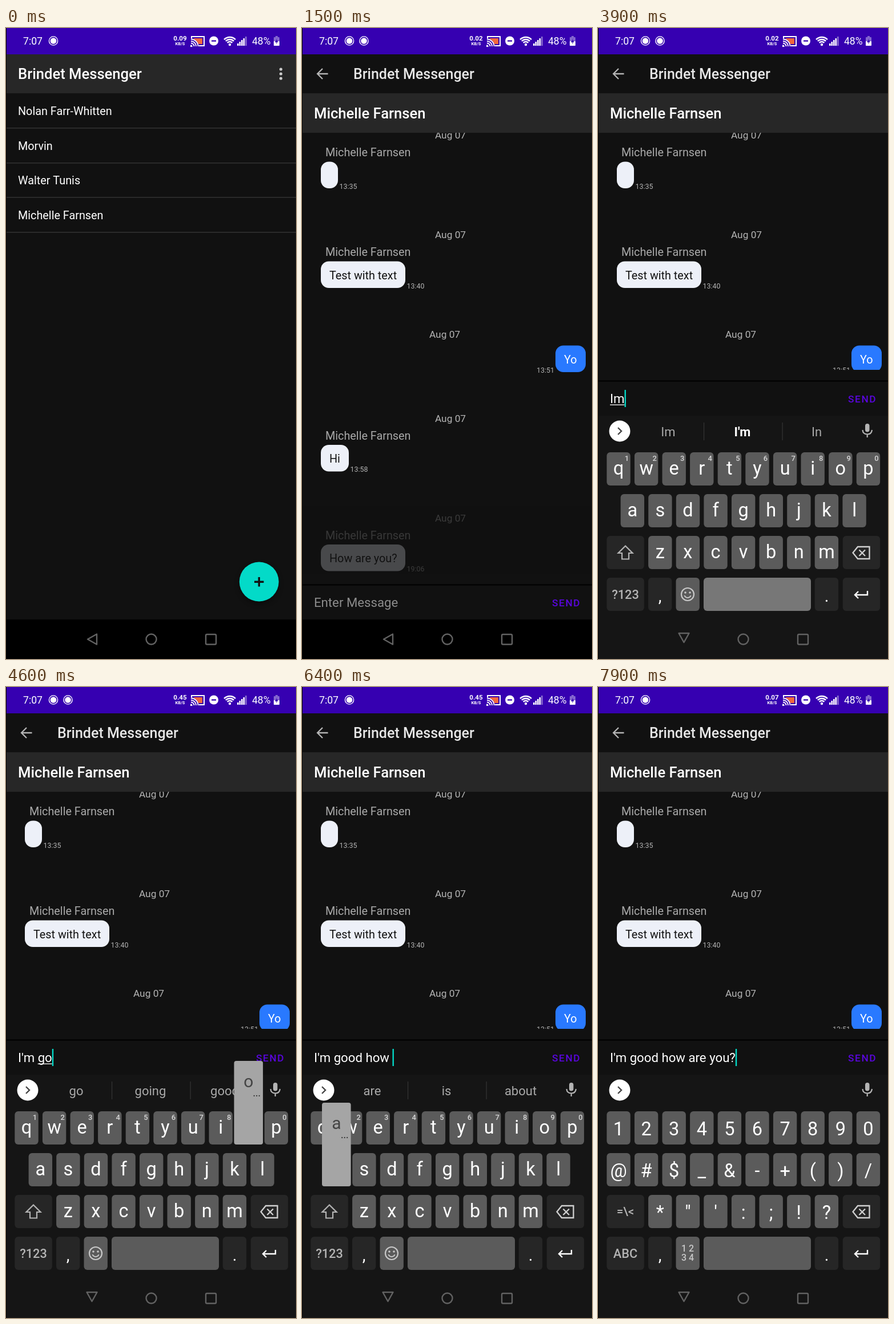
An HTML page with a canvas for the animation above (8000 ms loop, 508 px wide and 1102 px high).

```html
<!DOCTYPE html>
<html lang="en">
<head>
<meta charset="utf-8">
<title>Chat</title>
<style>
html, body { margin: 0; width: 100%; height: 100%; overflow: hidden; background: #000; }
canvas { display: block; }
</style>
</head>
<body>
<canvas id="stage" width="508" height="1102"></canvas>
<script>
const ctx = document.getElementById('stage').getContext('2d');
const LOOP = 8000, W = 508, H = 1102;
const APP = 'Brindet Messenger', FRIEND = 'Michelle Farnsen';
const CONTACTS = ['Nolan Farr-Whitten', 'Morvin', 'Walter Tunis', FRIEND];
const PURPLE = '#3600b1', BG = '#111', BAR = '#272727', TEAL = '#03dac8';
const KB = '#151515', KEY = '#5b5b5b', DARK = '#262626', SOFT = '#b4b4b4';

// Timeline, in ms
const TAP = 800, OPEN = 1000, LAST_MSG = 1450, FOCUS = 1600, KB_START = 2000, KB_END = 2250;
const HOLD = 140, SYMBOLS = 7450;
const PRESSES = [[3200, 'I'], [3500, 'm'], [3780, ' '], [4060, 'g'], [4280, 'o'], [4500, 'o'],
  [4780, 'd'], [5020, ' '], [5220, 'h'], [5430, 'o'], [5700, 'w'], [6180, ' '], [6330, 'a'],
  [6480, 'r'], [6630, 'e'], [6770, ' '], [6900, 'y'], [7020, 'o'], [7150, 'u'], [7650, '?']];
const HINTS = {
  'I': "I|I'm|It", 'Im': "Im|*I'm|In", "I'm ": 'not|so|going',
  'g': 'g|go|good', 'go': 'go|going|good', 'goo': 'goo|*good|goods', 'good': 'good|goods|goodbye',
  'good ': 'and|with|to', 'h': 'h|how|have', 'ho': 'ho|how|home', 'how': 'how|however|hows',
  'how ': 'are|is|about', 'a': 'a|and|are', 'ar': 'ar|are|around', 'are': 'are|area|areas',
  'are ': 'you|they|we', 'y': 'y|you|your', 'yo': 'yo|*you|your', 'you': 'you|your|young'
};
const LETTERS = { rows: ['qwertyuiop', 'asdfghjkl', 'zxcvbnm'], left: [36, 60.3, 108.8] };
const SIGNS = { rows: ['1234567890', '@#$_&-+()/', '*"\':;!?'], left: [36, 36, 108.8] };
const ROW_Y = [741, 814, 887, 960], PITCH = 48.6;

function text(s, x, y, size, color = '#fff', weight = 400, align = 'left') {
  ctx.font = `${weight} ${size}px Roboto, sans-serif`;
  ctx.textAlign = align;
  ctx.fillStyle = color;
  ctx.fillText(s, x, y);
}
const mid = (s, x, y, size, color, weight) => text(s, x, y, size, color, weight, 'center');

function box(x, y, w, h, color, r = 0) {
  ctx.fillStyle = color;
  ctx.beginPath();
  ctx.roundRect(x, y, w, h, r);
  ctx.fill();
}
function disc(x, y, r, color) {
  ctx.fillStyle = color;
  ctx.beginPath();
  ctx.arc(x, y, r, 0, 7);
  ctx.fill();
}
function arc(x, y, r, color, width, from = 0, to = 2 * Math.PI) {
  ctx.strokeStyle = color;
  ctx.lineWidth = width;
  ctx.beginPath();
  ctx.arc(x, y, r, from, to);
  ctx.stroke();
}
function draw(d, color, width = 2) {
  ctx.strokeStyle = color;
  ctx.lineWidth = width;
  ctx.stroke(new Path2D(d));
}
function fill(d, color) {
  ctx.fillStyle = color;
  ctx.fill(new Path2D(d));
}
function clipped(x, y, w, h, paint) {
  ctx.save();
  ctx.beginPath();
  ctx.rect(x, y, w, h);
  ctx.clip();
  paint();
  ctx.restore();
}

function statusBar(t) {
  box(1, 0, W, 46, PURPLE);
  text('7:07', 30, 28.5, 17.6);
  for (const x of t >= OPEN && t < 5000 ? [83, 108.5] : [83]) {
    arc(x, 22.5, 7.6, '#fff', 1.4);
    disc(x, 22.5, 5.3, '#fff');
  }
  const speed = t < 1300 ? '0.09' : t < 4000 ? '0.02' : t < 6500 ? '0.45' : '0.07';
  mid(speed, 305, 22, 11.6, '#fff', 700);
  mid('KB/S', 305, 30, 7.5, '#fff', 700);

  draw('M325 15H347V31H325Z', '#fff', 2);
  box(329, 18, 15, 10, '#f4673c');
  clipped(323, 17, 16, 16, () => {
    disc(323, 33, 15, PURPLE);
    disc(324, 32, 2.5, '#fff');
    for (const r of [5.5, 9, 12.5]) arc(324, 32, r, '#fff', 1.8, -Math.PI / 2, 0);
  });

  disc(364, 22.5, 8, '#fff');
  box(360, 21.4, 8, 2.3, PURPLE);
  disc(392, 29, 2.2, '#fff');
  for (const r of [6, 10, 14]) arc(392, 30, r, '#fff', 2.5, -2.36, -0.78);
  for (let i = 0; i < 5; i++) {
    const h = 4 + 3 * i;
    box(405 + 3.5 * i, 31 - h, 2.6, h, i < 4 ? '#fff' : '#8d70d0');
  }
  text('48%', 431, 28.5, 17.5);
  box(472, 14, 4, 3, '#8466cf');
  box(469, 16, 10, 15, '#8466cf', 1);
  box(469, 23, 10, 8, '#fff', 1);
  fill('M475 18L471 25H474L473 29L477 22H474Z', PURPLE);
}

function contacts(t) {
  box(1, 45, W, 69, BAR);
  text(APP, 21, 88.5, 25.6, '#fff', 500);
  for (const y of [72, 80, 88]) disc(481.5, y, 2.6, '#c8c8c8');
  if (t >= TAP) box(1, 297, W, 59, '#303030');
  CONTACTS.forEach((name, i) => {
    const y = 114 + 60.7 * i;
    text(name, 21, y + 38, 19.8);
    box(1, Math.round(y + 60), W, 1.5, '#333');
  });
  ctx.save();
  ctx.shadowColor = '#0006';
  ctx.shadowBlur = 8;
  ctx.shadowOffsetY = 4;
  disc(443.3, 967, 34.5, TEAL);
  ctx.restore();
  draw('M435 967.3H451.5M443.3 959V975.5', '#111', 3.4);
}

function message(y, width, body, time) {
  mid('Aug 07', 260, y + 6, 17.3, SOFT);
  text(FRIEND, 41, y + 37, 19.8, '#a9a9a9');
  box(33, y + 46.5, width, 46.5, '#edf0f8', 14);
  text(body, 48, y + 77.5, 19.8, '#111');
  text(time, 35.5 + width, y + 93.5, 12.4, SOFT);
}

function chat(t, lift) {
  clipped(1, 183, W, 770 - lift, () => {
    message(187, 30, '', '13:35');
    message(361, 148, 'Test with text', '13:40');
    mid('Aug 07', 250, 541, 17.3, SOFT);
    box(444, 554.5, 53, 46.5, '#2979ff', 14);
    mid('Yo', 470.3, 585.5, 19.8);
    text('13:51', 411, 601.5, 12.4, SOFT);
    message(681.5, 49, 'Hi', '13:58');
    message(855.5, 148, 'How are you?', '19:06');
    // The last message fades in as one group: a veil thins out over it.
    ctx.globalAlpha = 1 - Math.max(0, Math.min(1, (t - LAST_MSG) / 200));
    box(1, 835, W, 120, BG);
    ctx.globalAlpha = 1;
  });
  draw('M45.5 80H27M36 71L27 80L36 89', '#b5b5b5', 2.3);
  text(APP, 90, 89, 25, '#e6e6e6', 500);
  box(1, 114, W, 69, BAR);
  text(FRIEND, 21, 158, 25.6, '#fff', 500);
}

function typed(t) {
  const s = PRESSES.filter(([at]) => t >= at + HOLD).map(p => p[1]).join('');
  return s.replace('Im ', "I'm ");
}
const lastWord = s => (s.match(/[\w']+ ?$/) || [''])[0];

function inputBar(t, lift, value) {
  const y = 973 - lift, base = y + 38;
  box(1, y - 1, W, 61, BG);
  box(1, y - 1.5, W, 2, '#000');
  text(value || 'Enter Message', 21, base, 22.2, value ? '#fff' : '#8c8c8c');
  const end = 21 + (value ? ctx.measureText(value).width : 0);
  const word = lastWord(value);
  if (word && !word.endsWith(' ')) {
    const w = ctx.measureText(word).width;
    box(end - w, base + 2.5, w, 1.3, '#fff');
  }
  if (t >= FOCUS && (value || Math.floor((t - FOCUS) / 500) % 2 === 0)) box(end, y + 15, 2.4, 30, TEAL);
  ctx.letterSpacing = '1.6px';
  text('SEND', 438, y + 37, 17.3, '#5a05de', 500);
  ctx.letterSpacing = '0px';
}

function toolbar() {
  const c = '#a6a6a6';
  draw('M100 694H115Q117 694 117 696V708L110 714.5H100Q97.5 714.5 97.5 712V696Q97.5 694 100 694Z', c, 2.3);
  draw('M117 707H112Q110 707 110 709V714M102 704Q105 710 110 705', c, 1.8);
  disc(103, 700, 1.6, c);
  disc(111, 700, 1.6, c);
  mid('GIF', 176.5, 711, 19.5, c, 900);
  draw('M238 695H255V715H238Z', c, 2.3);
  box(242, 692, 9, 6, c, 2);
  draw('M241 702H252M241 706H252M241 710H249', c, 1.6);
  arc(316, 704, 6, c, 5);
  for (let i = 0; i < 6; i++) arc(316, 704, 8.7, c, 4, i * 1.047 + 0.29, i * 1.047 + 0.75);
  box(359, 690, 1.2, 28, '#3a3a3a');
  for (const x of [394, 401.5, 409]) disc(x, 704, 2.4, c);
}

function suggestions(word) {
  if (!HINTS[word]) return;
  HINTS[word].split('|').forEach((s, i) => {
    const best = s[0] === '*';
    mid(best ? s.slice(1) : s, 123 + 130 * i, 712.5, 22, best ? '#fff' : '#a9a9a9', best ? 700 : 400);
  });
  for (const x of [185, 322.5]) box(x, 689, 1.2, 31, '#353535');
}

function keyboard(t, value) {
  const symbols = t >= SYMBOLS, caps = !value, layout = symbols ? SIGNS : LETTERS;
  const pressed = PRESSES.find(([at]) => t >= at && t < at + HOLD);
  const down = pressed && pressed[1];
  box(1, 677, W, H - 677, KB);

  disc(38, 704, 18.5, '#fff');
  draw(caps ? 'M41 698L35 704L41 710' : 'M35 698L41 704L35 710', '#444', 2.4);
  if (caps) toolbar();
  else suggestions(lastWord(value));
  box(468, 691, 7.5, 14.5, SOFT, 4);
  draw('M463.5 702Q464 709.5 471.7 709.5Q479 709.5 480 702M471.7 709V715', SOFT, 2.2);

  let popup;
  layout.rows.forEach((row, r) => [...row].forEach((ch, i) => {
    const x = layout.left[r] + PITCH * i, y = ROW_Y[r];
    box(x - 20.7, y, 41.4, 58, KEY, 6);
    const label = caps && !symbols ? ch.toUpperCase() : ch;
    mid(label, x, y + 29 + (caps || symbols ? 13 : 9.7), 32.5);
    if (!symbols && r === 0) mid((i + 1) % 10, x + 14.5, y + 15, 13, '#d8d8d8', 500);
    if (down && ch === down.toLowerCase()) popup = [x, y, label];
  }));

  const [, , y3, y4] = ROW_Y;
  box(15.3, y3, 65.5, 58, DARK, 6);
  box(428.7, y3, 65.5, 58, DARK, 6);
  const arrow = 'M48 904.5L60.5 917H54V927.5H42V917H35.5Z';
  if (symbols) mid('=\\<', 48, 922.5, 20.5, SOFT, 500);
  else if (caps) fill(arrow, SOFT);
  else draw(arrow, SOFT, 2.2);
  draw('M455 906H475.5V927H455L446.5 916.5Z', '#d0d0d0', 2.3);
  draw('M457.5 911.5L468 922M468 911.5L457.5 922', '#d0d0d0', 2.3);

  const toSymbols = t >= SYMBOLS - HOLD && !symbols;
  box(15.3, y4, 65.5, 58, toSymbols ? '#444' : DARK, 6);
  box(88, y4, 41.4, 58, DARK, 6);
  box(136.5, y4, 41.4, 58, KEY, 6);
  box(185, y4, 188, 58, down === ' ' ? '#777' : KEY, 6);
  box(379.7, y4, 41.4, 58, DARK, 6);
  box(428.7, y4, 65.5, 58, DARK, 6);
  mid(symbols ? 'ABC' : '?123', 48, 997, 21.7, SOFT, 500);
  mid(',', 108.5, 1002, 29);
  mid('.', 400.5, 1002, 29);
  if (symbols) {
    mid('1 2', 157, 986, 16, '#c8c8c8', 500);
    mid('3 4', 157, 1002, 16, '#c8c8c8', 500);
  } else {
    arc(157, 989, 11, '#c8c8c8', 2.2);
    disc(153, 986, 1.8, '#c8c8c8');
    disc(161, 986, 1.8, '#c8c8c8');
    arc(157, 989, 6, '#c8c8c8', 2, 0.35, 2.8);
  }
  draw('M472 983V990H450M456 984L450 990L456 996', '#fff', 2.4);

  if (popup) {
    const [x, y, label] = popup;
    box(x - 25.3, y - 88, 50.6, 146, '#a5a5a5', 4);
    mid(label, x, y - 42, 30, '#444');
    mid('...', x + 14.5, y - 26, 16, '#333', 500);
  }
}

function navBar(kbShown) {
  const c = '#626262';
  ctx.lineJoin = 'round';
  draw(kbShown ? 'M141.5 1057H159.5L150.5 1073Z' : 'M159 1058.5V1076.5L143 1067.5Z', c, 2.4);
  arc(254.5, 1067.5, 9, c, 2.4);
  ctx.beginPath();
  ctx.roundRect(350, 1059, 18, 17.5, 2);
  ctx.stroke();
  ctx.lineJoin = 'miter';
}

function render(t) {
  box(0, 0, W, H, '#000');
  box(1, 45, W, 988, BG);
  const kbShown = t >= KB_START;
  if (t < OPEN) contacts(t);
  else {
    const lift = t >= KB_END ? 356 : 0, value = typed(t);
    chat(t, lift);
    inputBar(t, lift, value);
    if (kbShown) {
      const left = 1 - Math.min(1, (t - KB_START) / (KB_END - KB_START));
      box(1, 1033, W, 69, KB);
      ctx.save();
      ctx.translate(0, 425 * left * left);
      keyboard(t, value);
      ctx.restore();
    }
  }
  statusBar(t);
  navBar(kbShown);
}

function tick() {
  render(performance.now() % LOOP);
  requestAnimationFrame(tick);
}
tick();
</script>
</body>
</html>
```
